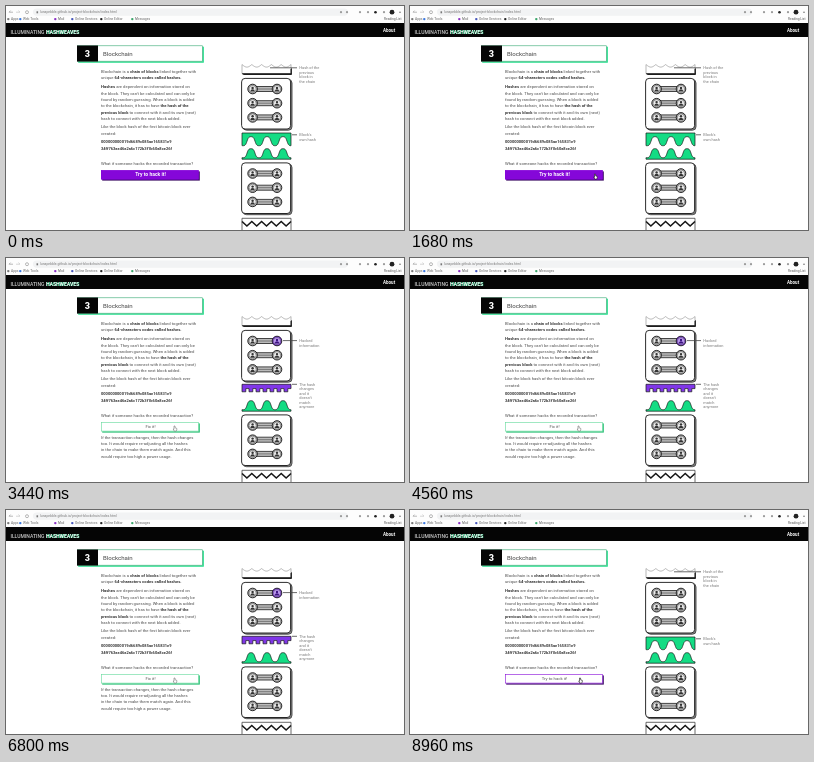
Write an HTML page with a canvas that moves like this. It is 398 px wide and 224 px high and loops after 9.04 s.

```html
<!DOCTYPE html>
<html lang="en">
<head>
<meta charset="utf-8">
<title>Blockchain</title>
<style>
  html, body { margin: 0; width: 100%; height: 100%; overflow: hidden; background: #fff; }
  canvas { display: block; width: 398px; height: 224px; }
</style>
</head>
<body>
<canvas id="stage"></canvas>
<script>
const W = 398, H = 224, LOOP = 9040;
const GREEN = '#14dc84', PURPLE = '#8507d9', VIOLET = '#8036e8', INK = '#161616', GREY = '#777';
const canvas = document.getElementById('stage');
const ratio = window.devicePixelRatio || 1;
canvas.width = Math.round(W * ratio);
canvas.height = Math.round(H * ratio);
const c = canvas.getContext('2d');
c.scale(ratio, ratio);

function rect(x, y, w, h, fill) {
  c.fillStyle = fill;
  c.fillRect(x, y, w, h);
}

function frame(x, y, w, h, colour, width = 0.8) {
  c.strokeStyle = colour;
  c.lineWidth = width;
  c.strokeRect(x, y, w, h);
}

function disc(x, y, r, fill, stroke, width = 0.8) {
  c.beginPath();
  c.arc(x, y, r, 0, Math.PI * 2);
  if (fill) { c.fillStyle = fill; c.fill(); }
  if (stroke) { c.strokeStyle = stroke; c.lineWidth = width; c.stroke(); }
}

function rounded(x, y, w, h, r, fill, stroke) {
  c.beginPath();
  c.roundRect(x, y, w, h, r);
  c.fillStyle = fill;
  c.fill();
  if (stroke) { c.strokeStyle = stroke; c.lineWidth = 0.9; c.stroke(); }
}

function line(points, colour, width) {
  c.beginPath();
  points.forEach(([x, y]) => c.lineTo(x, y));
  c.strokeStyle = colour;
  c.lineWidth = width;
  c.stroke();
}

function shape(points, fill, stroke, width = 0.8) {
  c.beginPath();
  points.forEach(([x, y]) => c.lineTo(x, y));
  c.closePath();
  c.fillStyle = fill;
  c.fill();
  c.strokeStyle = stroke;
  c.lineWidth = width;
  c.stroke();
}

function text(str, x, y, size = 4.2, colour = '#222', weight = 400, align = 'left') {
  c.font = `${weight} ${size}px Roboto, "Liberation Sans", sans-serif`;
  c.fillStyle = colour;
  c.textAlign = align;
  c.fillText(str, x, y);
  return c.measureText(str).width;
}

// Asterisks switch bold on and off.
function rich(str, x, y, size = 4.2) {
  str.split('*').forEach((part, i) => {
    x += text(part, x, y, size, i % 2 ? '#333' : '#4a4a4a', i % 2 ? 700 : 400);
  });
}

function browser() {
  rect(0, 0, W, 17, '#fdfdfd');
  rounded(27, 2.5, 315, 7.2, 3.6, '#f2f3f4');
  line([[7, 6.2], [3, 6.2], [4.6, 4.6]], '#888', 0.6);
  line([[10, 6.2], [14, 6.2], [12.4, 4.6]], '#bbb', 0.6);
  disc(21, 6.2, 1.5, null, '#888', 0.6);
  rect(30.5, 5.3, 1.6, 2, '#777');
  text('lunapebble.github.io/project-blockchain/index.html', 34, 7.3, 3.4, '#777');
  [335, 341, 354, 362, 378].forEach(x => disc(x, 6.2, 1.1, '#999'));
  disc(369.5, 6.2, 1.3, '#222');
  disc(386, 6.2, 2.4, '#222');
  disc(394, 6.2, 0.7, '#555');
  [['Apps', 1, '#777'], ['Web Tools', 13, '#3977df'], ['Mail', 48, '#8a2fc4'],
   ['Online Services', 65, '#4555bb'], ['Online Editor', 94, '#222'],
   ['Messages', 125, '#3aa66a']].forEach(([name, x, colour]) => {
    disc(x + 1.3, 13.1, 1.2, colour);
    text(name, x + 4, 14.2, 3.3, '#666');
  });
  text('Reading List', 378, 14.2, 3.2, '#555');
}

function header() {
  rect(0, 17, W, 14, '#050505');
  text('ILLUMINATING', 4.5, 27.6, 5, '#ccc', 500);
  text('HASHWEAVES', 40.4, 27.9, 5, GREEN, 700);
  text('HASHWEAVES', 40, 27.5, 5, '#fff', 700);
  text('About', 377, 25.8, 4.5, '#fff', 700);
}

function card() {
  rect(72.2, 40.7, 125.6, 16, GREEN);
  rect(71, 39.5, 125.6, 16, '#fff');
  frame(71.3, 39.8, 125, 15.4, '#35a872', 0.6);
  rect(71, 39.5, 21, 16, '#050505');
  text('3', 81.3, 51, 9, '#fff', 900, 'center');
  text('Blockchain', 97, 50, 6.1, '#444');
}

const copy = [
  ['Blockchain is a *chain of blocks* linked together with', 66.7],
  ['unique *64-characters codes called hashes.*', 73.3],
  ['*Hashes* are dependent on information stored on', 82.4],
  ["the block. They can't be calculated and can only be", 88.7],
  ['found by random guessing. When a block is added', 95],
  ['to the blockchain, it has to have *the hash of the*', 101.3],
  ['*previous block* to connect with it and its own (next)', 107.6],
  ['hash to connect with the next block added.', 113.9],
  ['Like the block hash of the first bitcoin block ever', 122.4],
  ['created:', 128.7],
  ['*000000000019d6689c085ae165831e9*', 136.9, 4],
  ['*34ff763ae46a2a6c172b3f1b60a8ce26f*', 143.5, 4],
  ['What if someone hacks the recorded transaction?', 158.5]
];
const consequence = [
  'If the transaction changes, then the hash changes',
  'too. It would require re-adjusting all the hashes',
  'in the chain to make them match again. And this',
  'would require too high a power usage.'
];

function button(hacked, hover) {
  rect(96.2, 165.4, 97.6, 9.2, hacked ? '#25bd72' : '#3a0a63');
  rect(95, 164.2, 97.6, 9.2, hover ? PURPLE : '#fff');
  frame(95.3, 164.5, 97, 8.6, hacked ? '#62d99a' : PURPLE, 0.6);
  const label = hacked ? 'Fix it!' : 'Try to hack it!';
  text(label, 144.5, 170.4, hover ? 5 : 4.3, hover ? '#fff' : '#555', hover ? 700 : 400, 'center');
}

function person(x, y, marked) {
  disc(x, y, 4.8, marked ? VIOLET : '#aaa', INK, 0.9);
  disc(x, y, 3.5, marked ? '#c09bf7' : '#eee', '#555', 0.5);
  disc(x, y - 1.1, 1.2, marked ? '#3b127e' : '#333');
  c.beginPath();
  c.arc(x, y + 2.5, 2.2, Math.PI, 0);
  c.fill();
}

function block(top, hacked) {
  rounded(237, top + 1.6, 49, 50.6, 3.5, '#8a8a8a', '#444');
  rounded(235.6, top + 0.4, 49, 50.6, 3.5, '#fff', INK);
  for (let row = 0; row < 3; row++) {
    const y = top + 11 + row * 14.2;
    rounded(245, y - 2.5, 27, 5, 1, '#bbb', '#333');
    line([[249, y], [268, y]], '#666', 0.8);
    person(246.6, y);
    person(271, y, hacked && row === 0);
  }
}

// Wave with rounded crests and flattened ends, one crest per period.
function curve(y, amp) {
  const points = [];
  for (let x = 236; x <= 285; x += 0.5) {
    const s = Math.tanh(1.5 * Math.cos((x - 245) * Math.PI / 8));
    points.push([x, y - amp * s]);
  }
  return points;
}

function topHash() {
  const wave = [];
  for (let x = 236; x <= 285; x += 0.5) {
    wave.push([x, 58.5 + 2.6 * Math.abs(Math.sin((x - 236) * Math.PI / 9.8))]);
  }
  rounded(237, 62, 49, 7, 1, INK);
  shape([[236, 67.6], ...wave, [285, 67.6]], '#fff', '#999', 0.7);
  line([[236, 67.8], [285, 67.8], [285, 63]], INK, 0.9);
}

function ownHash(hacked) {
  shape([[236, 153.2], ...curve(147.2, 5), [285, 153.2]], GREEN, INK, 0.7);
  if (hacked) {
    const teeth = [[236, 126.3]];
    for (let i = 0; i < 7; i++) {
      const x = 236 + i * 7;
      teeth.push([x, 133.8], [x + 3.8, 133.8], [x + 3.8, 130.6], [x + 7, 130.6]);
    }
    shape([...teeth, [285, 126.3]], VIOLET, INK, 0.7);
  } else {
    shape([[236, 127], ...curve(135.2, 5), [285, 127]], GREEN, INK, 0.7);
  }
}

function bottomHash() {
  const zigzag = [];
  for (let i = 0; i <= 10; i++) zigzag.push([236 + i * 4.9, i % 2 ? 220 : 215.5]);
  line([[236, 224], [236, 212.3], [285, 212.3], [285, 224]], '#444', 0.8);
  line(zigzag, INK, 1.6);
}

function note(lines, y, from) {
  line([[from, y], [291, y]], '#444', 0.8);
  lines.forEach((str, i) => text(str, 293.3, y + 1.4 + i * 4.5, 3.9, GREY));
}

function diagram(hacked) {
  topHash();
  block(72, hacked);
  ownHash(hacked);
  block(156.5, false);
  bottomHash();
  if (hacked) {
    note(['Hacked', 'information'], 82.6, 277);
    note(['The hash', 'changes', 'and it', "doesn't", 'match', 'anymore'], 126.3, 286);
  } else {
    note(['Hash of the', 'previous', 'block in', 'the chain'], 61.8, 264);
    note(["Block's", 'own hash'], 128.8, 286);
  }
}

function glide(t, start, end, a, b) {
  const p = Math.min(1, Math.max(0, (t - start) / (end - start)));
  return a + (b - a) * p * p * (3 - 2 * p);
}

function pointer(t, hacked) {
  if (t < 800) return;
  let x = glide(t, 800, 1600, 191, 185.5);
  if (t >= 1760) x = glide(t, 1760, 2560, 185.5, 169);
  if (t >= 4640) x = glide(t, 4640, 4880, 169, 170.5);
  if (t >= 6000) x = glide(t, 6000, 6240, 170.5, 169);
  if (t >= 8640) x = glide(t, 8640, 8880, 169, 170.5);
  c.save();
  c.translate(x, 170.4);
  shape([[-1, -2.4], [0, -2.4], [0.2, -0.5], [1.8, 0], [1.8, 1.6], [1.1, 2.7],
         [-0.7, 2.7], [-1.8, 0.6], [-1, 0.8]], '#fff', hacked ? '#777' : INK, 0.6);
  c.restore();
}

function draw(now) {
  const t = now % LOOP;
  const hacked = (t >= 2640 && t < 4640) || (t >= 6720 && t < 8640);
  const hover = t < 2640 || (t >= 6000 && t < 6720);
  rect(0, 0, W, H, '#fff');
  browser();
  header();
  card();
  copy.forEach(([str, y, size]) => rich(str, 95, y, size));
  button(hacked, hover);
  if (hacked) consequence.forEach((str, i) => rich(str, 95, 180.6 + i * 6.3));
  diagram(hacked);
  pointer(t, hacked);
}

const start = performance.now();
function tick() {
  draw(performance.now() - start);
  requestAnimationFrame(tick);
}
tick();
</script>
</body>
</html>
```
